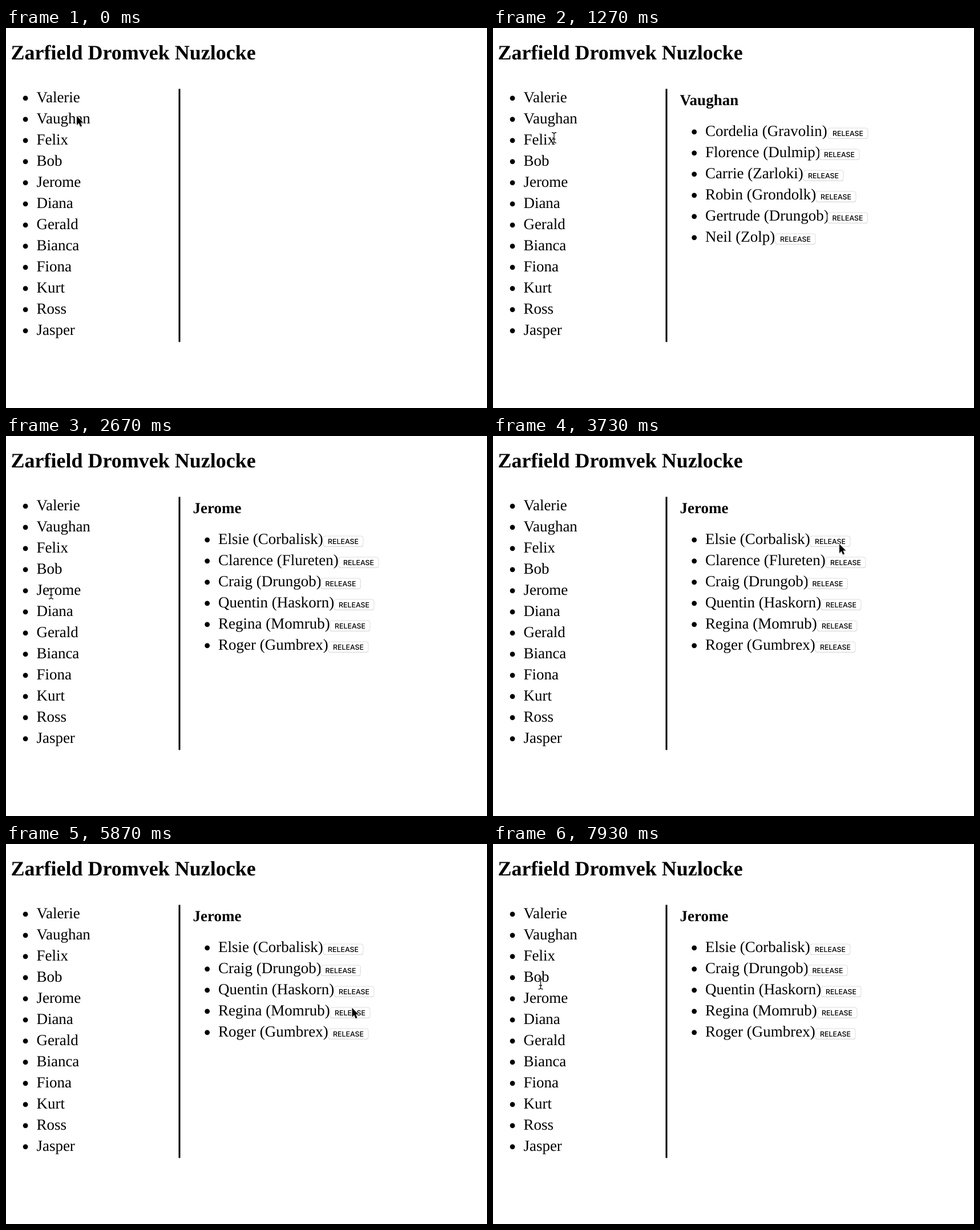
Write an HTML page that moves like this. It is 843 px wide and 665 px high and loops after 8000 ms.

```html
<!DOCTYPE html>
<html lang="en">
<head>
<meta charset="utf-8">
<title>Trainer list</title>
<style>
  html, body { margin: 0; width: 100%; height: 100%; overflow: hidden; background: #fff; }
  svg { display: block; width: 100%; height: 100%; }
  text { font-family: "Liberation Serif", "Times New Roman", serif; font-size: 27px; text-rendering: geometricPrecision; }
  .title { font-size: 36px; font-weight: bold; }
  .name { font-weight: bold; }
  .label { font-family: Inter, Roboto, sans-serif; font-size: 12.4px; font-weight: 500; text-anchor: middle; }
</style>
</head>
<body>
<svg id="stage" viewBox="0 0 843 665" xmlns="http://www.w3.org/2000/svg">
  <defs>
    <linearGradient id="pressed" x1="0" y1="0" x2="0" y2="1">
      <stop offset="0" stop-color="#5e97f8"/>
      <stop offset="1" stop-color="#2860d6"/>
    </linearGradient>
    <filter id="soft" x="-50%" y="-50%" width="200%" height="200%">
      <feGaussianBlur stdDeviation="1.1"/>
    </filter>
  </defs>
  <rect width="843" height="665" fill="#fff"/>
  <text class="title" x="8.5" y="55">Zarfield Dromvek Nuzlocke</text>
  <rect x="302.5" y="106.5" width="3" height="443"/>
  <g id="trainers"></g>
  <g id="panels"></g>
  <g id="arrow">
    <path d="M0 1.5V17.5L3.8 14 6.4 20.2 9.2 19 6.7 13H11.6Z" opacity=".3" filter="url(#soft)"/>
    <path d="M0 0V16L3.7 12.6 6.2 18.6 9 17.4 6.5 11.5H11.4Z" stroke="#fff" stroke-width="1.6" paint-order="stroke"/>
  </g>
  <g id="beam" fill="none">
    <path class="bar" stroke="#fff" stroke-width="2.6" opacity=".6"/>
    <path class="bar" stroke="#111" stroke-width="1.3"/>
  </g>
</svg>
<script>
const LOOP = 8000, ROW = 37;
const $ = id => document.getElementById(id);

function add(parent, tag, attrs, text) {
  const el = document.createElementNS("http://www.w3.org/2000/svg", tag);
  for (const k in attrs) el.setAttribute(k, attrs[k]);
  if (text) el.textContent = text;
  parent.appendChild(el);
  return el;
}

const move = (el, x, y) => el.setAttribute("transform", `translate(${x.toFixed(2)} ${y.toFixed(2)})`);
const show = (el, on) => el.setAttribute("visibility", on ? "visible" : "hidden");

function item(parent, x, text) {
  const g = add(parent, "g", {});
  add(g, "circle", { cx: x - 19.3, cy: -7.2, r: 4.4 });
  add(g, "text", { x, y: 0 }, text);
  return g;
}

["Valerie", "Vaughan", "Felix", "Bob", "Jerome", "Diana", "Gerald", "Bianca",
 "Fiona", "Kurt", "Ross", "Jasper"].forEach((name, i) =>
  move(item($("trainers"), 53.4, name), 0, 130 + i * ROW));

// Each team row: label and the centre of its button.
const teams = [
  ["Vaughan", [["Cordelia (Gravolin)", 622], ["Florence (Dulmip)", 607], ["Carrie (Zarloki)", 579],
    ["Robin (Grondolk)", 601], ["Gertrude (Drungob)", 621.5], ["Neil (Zolp)", 530]]],
  ["Jerome", [["Elsie (Corbalisk)", 591], ["Clarence (Flureten)", 618], ["Craig (Drungob)", 586.5],
    ["Quentin (Haskorn)", 610], ["Regina (Momrub)", 603], ["Roger (Gumbrex)", 600]]]
];

function button(parent, cx) {
  const box = { x: cx - 35, width: 70, height: 18.4, rx: 4 };
  add(parent, "rect", { ...box, y: -13.3, fill: "#c2c2c2" });
  const face = add(parent, "rect", { ...box, y: -14 });
  add(parent, "text", { class: "label", x: cx, y: -0.2 }, "RELEASE");
  return face;
}

const panels = teams.map(([name, rows]) => {
  const g = add($("panels"), "g", {});
  add(g, "text", { class: "name", x: 327.6, y: 135 }, name);
  const list = rows.map(([label, cx]) => {
    const row = item(g, 372, label);
    return { row, face: button(row, cx) };
  });
  return { g, list };
});

function paint(face, pressed) {
  face.setAttribute("fill", pressed ? "url(#pressed)" : "#fff");
  face.setAttribute("stroke", pressed ? "#2f62c4" : "#d4d4d4");
  face.setAttribute("stroke-width", pressed ? 0.9 : 0.8);
}

document.querySelectorAll(".bar").forEach(p => p.setAttribute("d",
  "M-4 -9Q0 -9 0 -6.5Q0 -9 4 -9M0 -7V7M-4 9Q0 9 0 6.5Q0 9 4 9M-2.5 2.5H2.5"));

// Pointer path: time, x, y.
const path = [
  [0, 124, 154], [670, 124, 154], [1270, 107, 192], [1490, 107, 192],
  [2000, 72, 303], [2330, 79, 276], [2670, 79, 276], [3330, 617, 265],
  [3440, 617, 265], [3730, 607, 189], [4270, 607, 207], [4480, 607, 207],
  [4670, 608, 220], [5620, 608, 220], [6000, 606, 311], [6270, 603, 286],
  [7069, 603, 286], [7070, 590, 234], [7870, 83.5, 245], [LOOP, 83.5, 245]
];

function pointer(t) {
  const i = Math.max(1, path.findIndex(p => p[0] > t));
  const [t0, x0, y0] = path[i - 1], [t1, x1, y1] = path[i];
  const u = (t - t0) / (t1 - t0), e = u * u * (3 - 2 * u);
  return [x0 + (x1 - x0) * e, y0 + (y1 - y0) * e];
}

function render(t) {
  const removed = t >= 5400;
  show(panels[0].g, t >= 670 && t < 2670);
  show(panels[1].g, t >= 2670);
  panels.forEach(({ list }, p) => list.forEach(({ row, face }, i) => {
    const gone = p === 1 && removed;
    row.setAttribute("display", gone && i === 1 ? "none" : "inline");
    move(row, 0, 189 + ROW * (gone && i > 1 ? i - 1 : i));
    paint(face, p === 1 && i === 1 && t >= 5200 && t < 5400);
  }));

  const [x, y] = pointer(t);
  const beam = t >= 7930 || (t >= 400 && t < 3330 && x < 135);
  show($("beam"), beam);
  show($("arrow"), !beam);
  move($(beam ? "beam" : "arrow"), x, y);
}

function frame() {
  render(performance.now() % LOOP);
  requestAnimationFrame(frame);
}
frame();
</script>
</body>
</html>
```
